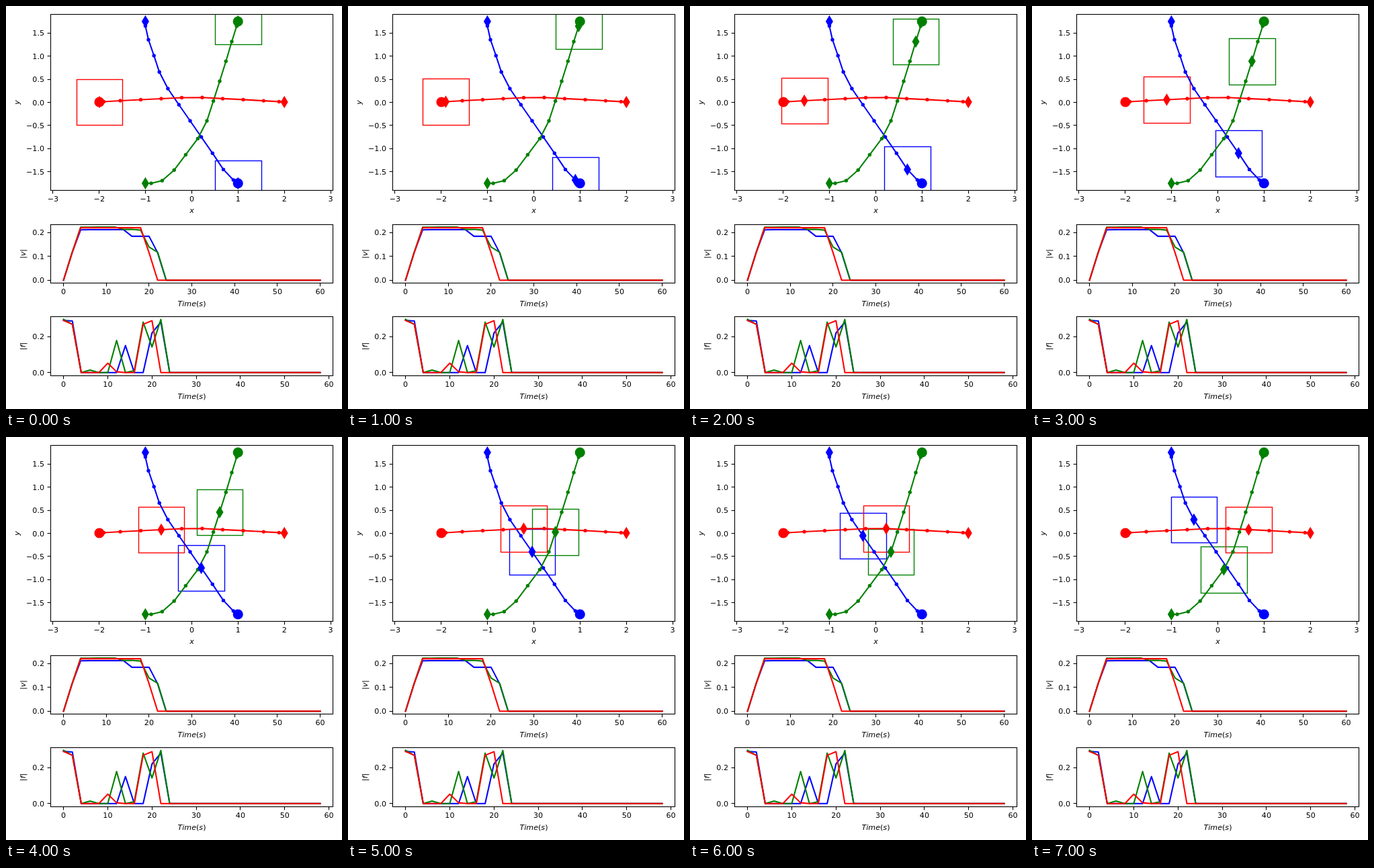
These frames come from a looping animation (500x600 px, 8000 ms). An HTML page:

```html
<!DOCTYPE html>
<html lang="en">
<head>
<meta charset="utf-8">
<title>Three agent paths</title>
<style>
html, body { margin: 0; width: 100%; height: 100%; overflow: hidden; background: #fff; }
svg { display: block; }
text { font: 11.11px "DejaVu Sans", sans-serif; fill: #000; }
.it { font-style: italic; }
.up { font-style: normal; }
.line { fill: none; stroke-width: 2.08; stroke-linejoin: round; stroke-linecap: square; }
.axis { fill: none; stroke: #000; stroke-width: 1.11; }
.box { fill: none; stroke-width: 1.39; }
.mark { stroke-width: 1.39; stroke-miterlimit: 10; }
</style>
</head>
<body>
<svg id="stage" width="500" height="600" viewBox="0 0 500 600">
<defs><clipPath id="plot"><rect x="66.5" y="12.5" width="420" height="262"/></clipPath></defs>
</svg>
<script>
const stage = document.getElementById("stage");
const STEP = 1000, COUNT = 8, HALF = 34.4;

function add(tag, attrs, parent = stage) {
  const el = document.createElementNS("http://www.w3.org/2000/svg", tag);
  for (const k in attrs) el.setAttribute(k, attrs[k]);
  parent.appendChild(el);
  return el;
}

function label(html, x, y, anchor = "middle", extra = {}) {
  add("text", { x, y, "text-anchor": anchor, ...extra }).innerHTML = html;
}

const snap = v => Math.floor(v + 0.5) + 0.5;
const num = (v, d) => v.toFixed(d).replace("-", "\u2212");

// Stage positions at each 2 s step
const agents = [
  { color: "#0000ff", path: [[345.2, 264], [338.3, 259], [323.5, 243.4], [307.3, 219.2], [290.6, 195],
    [274, 171], [257.3, 147], [240.9, 123], [228.2, 98.3], [220.2, 74], [212, 50.2], [207.4, 29.8], [207.4, 23]] },
  { color: "#008000", path: [[345.2, 23], [343.2, 30], [336, 53], [327.3, 82.3], [318, 112],
    [308.6, 141.4], [299, 171], [285.4, 197.4], [267.4, 221.4], [250.2, 244.3], [232.4, 260], [216, 264], [207.4, 264]] },
  { color: "#ff0000", path: [[139, 143], [145.5, 142.5], [170.1, 141], [200.5, 139.5], [231, 138],
    [261.5, 136.5], [292, 136.3], [322.4, 137.9], [353, 139.4], [383.3, 141.1], [406.3, 142.4], [414.2, 143]] }
];

const charts = [
  { top: 325.5, bottom: 412.5, x0: 85.6, dx: 6.366, y0: 408.2, dy: 355, last: 60,
    ticks: [0, 0.1, 0.2], name: "v", series: [
    [0, .115, .211, .212, .212, .212, .212, .212, .184, .184, .184, .115, 0],
    [0, .115, .222, .222, .223, .223, .223, .213, .213, .21, .139, .117, 0],
    [0, .114, .22, .22, .22, .22, .22, .22, .22, .22, .115, 0]] },
  { top: 462.5, bottom: 550.5, x0: 85.6, dx: 6.583, y0: 545.7, dy: 268, last: 58,
    ticks: [0, 0.2], name: "f", series: [
    [.29, .286, 0, 0, 0, 0, 0, .15, 0, 0, .22, .28, 0],
    [.296, .267, 0, .014, 0, 0, .178, 0, .01, .28, .142, .295, 0],
    [.289, .268, 0, 0, 0, .052, .004, 0, 0, .268, .288, 0]] }
];

function xTick(x, bottom, text) {
  add("path", { class: "axis", d: `M${snap(x - 0.5)} ${bottom}v4.9` });
  label(text, x, bottom + 16.4);
}

function yTick(y, text) {
  add("path", { class: "axis", d: `M66.5 ${snap(y - 0.5)}h-4.9` });
  label(text, 57, y + 4.1, "end");
}

function frame(top, bottom) {
  add("rect", { class: "axis", x: 66.5, y: top, width: 420, height: bottom - top });
}

function yLabel(html, x, y) {
  label(html, 0, 0, "middle", { class: "it", transform: `translate(${x} ${y}) rotate(-90)` });
}

function diamond(parent, color) {
  return add("path", { class: "mark", d: "M0 -7.86L4.71 0L0 7.86L-4.71 0Z", fill: color, stroke: color }, parent);
}

const place = (el, [x, y]) => el.setAttribute("transform", `translate(${x} ${y})`);

// Main plot
const plot = add("g", { "clip-path": "url(#plot)" });
for (const a of agents)
  a.box = add("rect", { class: "box", stroke: a.color, width: 69, height: 69 }, plot);
for (const { color, path } of agents) {
  add("polyline", { class: "line", points: path.join(" "), stroke: color }, plot);
  for (const [cx, cy] of path) add("circle", { cx, cy, r: 2.7, fill: color }, plot);
}
for (const a of agents) {
  const [cx, cy] = a.path[0];
  add("circle", { cx, cy, r: 7.6, fill: a.color }, plot);
  place(diamond(plot, a.color), a.path[a.path.length - 1]);
  a.marker = diamond(plot, a.color);
}
frame(12.5, 274.5);
for (let v = -3; v <= 3; v++) xTick(276.5 + v * 68.85, 274.5, num(v, 0));
for (let v = -1.5; v <= 1.5; v += 0.5) yTick(143.4 - v * 68.8, num(v, 1));
label("x", 276.5, 308, "middle", { class: "it" });
yLabel("y", 20, 143.5);

// Lower charts
for (const c of charts) {
  c.series.forEach((values, i) => {
    const pts = values.map((v, k) => [c.x0 + k * 2 * c.dx, c.y0 - v * c.dy]);
    pts.push([c.x0 + c.last * c.dx, c.y0]);
    add("polyline", { class: "line", points: pts.join(" "), stroke: agents[i].color });
  });
  frame(c.top, c.bottom);
  for (let t = 0; t <= 60; t += 10) xTick(c.x0 + t * c.dx, c.bottom, t);
  for (const v of c.ticks) yTick(c.y0 - v * c.dy, num(v, 1));
  label('Time<tspan class="up">(</tspan>s<tspan class="up">)</tspan>', 276.5, c.bottom + 34.5, "middle", { class: "it" });
  yLabel(`<tspan class="up">|</tspan>${c.name}<tspan class="up">|</tspan>`, 29, (c.top + c.bottom) / 2);
}

function draw(ms) {
  const k = Math.floor(ms / STEP) % COUNT;
  for (const { path, box, marker } of agents) {
    const [x, y] = path[k];
    const left = snap(x - HALF), top = snap(y - HALF);
    box.setAttribute("x", left);
    box.setAttribute("y", top);
    box.setAttribute("width", snap(x + HALF) - left);
    box.setAttribute("height", snap(y + HALF) - top);
    place(marker, path[k]);
  }
}

const start = performance.now();
function tick() {
  draw(performance.now() - start);
  requestAnimationFrame(tick);
}
tick();
</script>
</body>
</html>
```
